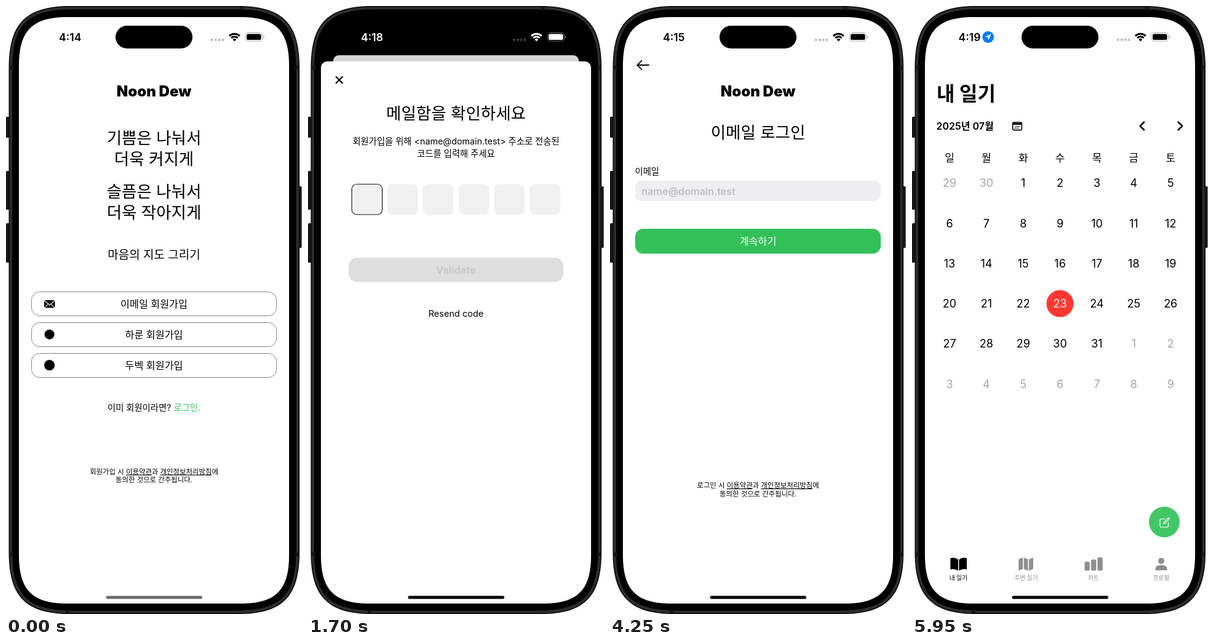
Write an HTML page that moves like this. It is 481x988 px and loops after 6.8 s.

```html
<!DOCTYPE html>
<html lang="ko">
<head>
<meta charset="utf-8">
<title>App tour</title>
<style>
  html, body { margin: 0; width: 100%; height: 100%; overflow: hidden; background: #fff; }
  svg { display: block; }
  text { font-family: Inter, "Noto Sans CJK KR", sans-serif; text-anchor: middle; fill: #000; }
  .left { text-anchor: start; }
  .time { font-size: 17.5px; font-weight: 600; text-anchor: start; }
  .brand { font-size: 24px; font-weight: 900; }
  .hero { font-size: 26.5px; }
  .sub { font-size: 19px; }
  .btn { font-size: 16.2px; }
  .body { font-size: 14.3px; }
  .fine { font-size: 11.4px; }
  .fine tspan { text-decoration: underline; }
  .day { font-size: 18px; }
  .tab { font-size: 9.7px; font-weight: 500; }
  .dim { fill: #a5a5a5; }
  .idle { fill: #8e8e8e; }
  .light { fill: #fff; }
  .line { fill: none; stroke: #000; stroke-linecap: round; stroke-linejoin: round; }
  .outline { fill: #fff; stroke: #858585; }

  .screen {
    visibility: hidden;
    animation: show 3400ms step-end infinite;
    animation-delay: calc(var(--i) * 850ms - 3400ms);
  }
  @keyframes show {
    0% { visibility: visible; }
    25%, 100% { visibility: hidden; }
  }
</style>
</head>
<body>
<svg width="481" height="988" viewBox="0 0 481 988">
  <defs>
    <clipPath id="glass"><path data-box="21 18 439 953 62"/></clipPath>
    <g id="status">
      <g fill="var(--dot, #bdbdbd)">
        <circle cx="334.7" cy="55" r="2.1"/><circle cx="340.7" cy="55" r="2.1"/>
        <circle cx="346.7" cy="55" r="2.1"/><circle cx="352.6" cy="55" r="2.1"/>
      </g>
      <g fill="none" stroke="currentColor" stroke-width="3">
        <path d="M362.9 48.6a11.9 11.9 0 0 1 16.8 0"/>
        <path d="M366.1 51.9a7.3 7.3 0 0 1 10.4 0"/>
      </g>
      <path d="M371.3 57.4l-2.9-2.9a4.1 4.1 0 0 1 5.8 0z" fill="currentColor"/>
      <rect x="389" y="43.5" width="27.5" height="13.5" rx="4.3" fill="none" stroke="var(--rim, #a6a6a6)"/>
      <rect x="391" y="45.5" width="23.5" height="9.5" rx="2.6" fill="currentColor"/>
      <path d="M418 48q1.6.6 1.6 2.3t-1.6 2.3z" fill="var(--rim, #a6a6a6)"/>
    </g>
    <rect id="home" x="162.5" y="958.5" width="156.5" height="5" rx="2.5"/>
  </defs>

  <!-- phone -->
  <g fill="#171717">
    <rect y="180" width="8" height="34" rx="1.5"/>
    <rect y="268" width="8" height="63" rx="1.5"/>
    <rect y="353" width="8" height="64" rx="1.5"/>
    <rect x="473" y="293" width="7.5" height="100" rx="1.5"/>
  </g>
  <path data-box="4.5 0 472.5 988 79" fill="#0c0c0c"/>
  <path data-box="8 3.5 465.5 981 75.5" stroke="#2d2d2d" stroke-width="4"/>
  <path d="M5 100h7M470 100h7M5 891h7M470 891h7M382 0v7M100 981v7" stroke="#151515" stroke-width="6"/>
  <path data-box="21 18 439 953 62" fill="#fff"/>
  <rect x="178" y="32" width="125" height="37" rx="18.5"/>

  <!-- sign up -->
  <g class="screen" style="--i:0">
    <text class="time" x="86" y="57">4:14</text>
    <use href="#status"/>
    <text class="brand" x="240.5" y="147">Noon Dew</text>
    <g class="hero">
      <text x="240.5" y="224">기쁨은 나눠서</text>
      <text x="240.5" y="258">더욱 커지게</text>
      <text x="240.5" y="311">슬픔은 나눠서</text>
      <text x="240.5" y="345">더욱 작아지게</text>
    </g>
    <text class="sub" x="240.5" y="411">마음의 지도 그리기</text>
    <g class="outline">
      <rect x="41.5" y="464.5" width="398" height="39" rx="13"/>
      <rect x="41.5" y="514.5" width="398" height="39" rx="13"/>
      <rect x="41.5" y="564.5" width="398" height="39" rx="13"/>
    </g>
    <rect x="62" y="478" width="17.5" height="12.5" rx="2"/>
    <path d="M62.5 479l8.3 6.8 8.2-6.8M63 490l5-5.4M78.5 490l-5-5.4" fill="none" stroke="#fff" stroke-width="1.1"/>
    <circle cx="70.6" cy="533.7" r="8"/>
    <circle cx="70.6" cy="583.7" r="8.6"/>
    <g class="btn">
      <text x="240.5" y="490">이메일 회원가입</text>
      <text x="240.5" y="540">하룬 회원가입</text>
      <text x="240.5" y="590">두벡 회원가입</text>
    </g>
    <text class="body" x="240.5" y="658">이미 회원이라면? <tspan fill="#34c759">로그인.</tspan></text>
    <text class="fine" x="240.5" y="760.5">회원가입 시 <tspan>이용약관</tspan>과 <tspan>개인정보처리방침</tspan>에</text>
    <text class="fine" x="240.5" y="774">동의한 것으로 간주됩니다.</text>
    <use href="#home" fill="#6e6e6e"/>
  </g>

  <!-- log in -->
  <g class="screen" style="--i:1">
    <text class="time" x="86" y="57">4:15</text>
    <use href="#status"/>
    <path class="line" d="M63 96H44.5M51.5 88.8L44.3 96l7.2 7.2" stroke-width="1.8"/>
    <text class="brand" x="240.5" y="147">Noon Dew</text>
    <text class="hero" x="240.5" y="215">이메일 로그인</text>
    <text class="body left" x="40.5" y="273.5">이메일</text>
    <rect x="41" y="284" width="399" height="33" rx="10" fill="#eeeef1"/>
    <text class="left" x="51" y="307" font-size="16.5" font-weight="500" style="fill:#b9b9bc">name@domain.test</text>
    <rect x="41" y="362" width="399" height="40.5" rx="13" fill="#34c059"/>
    <text class="btn light" x="240.5" y="388">계속하기</text>
    <text class="fine" x="240.5" y="783">로그인 시 <tspan>이용약관</tspan>과 <tspan>개인정보처리방침</tspan>에</text>
    <text class="fine" x="240.5" y="797">동의한 것으로 간주됩니다.</text>
    <use href="#home"/>
  </g>

  <!-- code sheet -->
  <g class="screen" style="--i:2">
    <path data-box="20 17 441 955 63"/>
    <rect x="41" y="80" width="399" height="30" rx="9" fill="#d5d5d5"/>
    <g clip-path="url(#glass)"><rect x="21" y="90" width="439" height="900" rx="10" fill="#fff"/></g>
    <text class="time light" x="86" y="57">4:18</text>
    <use href="#status" style="color:#fff;--dot:#444;--rim:#6c6c6c"/>
    <path class="line" d="M45.7 115l10.2 10.2M55.9 115l-10.2 10.2" stroke-width="2.3"/>
    <text class="hero" x="240.5" y="184">메일함을 확인하세요</text>
    <text class="body" x="240.5" y="224.5">회원가입을 위해 &lt;name@domain.test&gt; 주소로 전송된</text>
    <text class="body" x="240.5" y="244.5">코드를 입력해 주세요</text>
    <g id="code" fill="#f0f0f0"></g>
    <rect x="66" y="409" width="349" height="39.5" rx="14" fill="#dedede"/>
    <text x="240.5" y="435" font-size="16.5" font-weight="600" style="fill:#c5c5c5">Validate</text>
    <text x="240.5" y="505" font-size="14.5">Resend code</text>
    <use href="#home"/>
  </g>

  <!-- diary -->
  <g class="screen" style="--i:3">
    <text class="time" x="75.5" y="57">4:19</text>
    <circle cx="123.7" cy="50.5" r="9.4" fill="#0a7aff"/>
    <path d="M128.6 45.6l-4.3 10-.9-4.8-4.7-.9z" fill="#fff"/>
    <use href="#status"/>
    <text class="left" x="40" y="154" font-size="32" font-weight="700">내 일기</text>
    <text class="left" x="39.5" y="201" font-size="16" font-weight="600">2025년 07월</text>
    <rect class="line" x="163.6" y="189" width="14.8" height="12.6" rx="2.3" stroke-width="1.6"/>
    <path d="M163.6 190h14.8v3h-14.8z"/>
    <path d="M168 195.7h8M166 198.5h8" stroke="#000" stroke-width="1.5" stroke-dasharray="1.5 1"/>
    <path class="line" d="M377 188.7l-6.4 6.3 6.4 6.3M432.7 188.7l6.4 6.3-6.4 6.3" stroke-width="2.7"/>
    <circle cx="240.5" cy="483.6" r="22" fill="#ff3831"/>
    <g id="month"></g>
    <circle cx="410" cy="838.5" r="25" fill="#43c766"/>
    <path class="line" d="M411 833.5h-5.5q-2.500 0-2.500 2.500v8.500q0 2.500 2.500 2.500h8.500q2.500 0 2.500-2.500v-5.500M408.800 841.300l.7-2.600 7.400-7.400 1.700 1.700-7.400 7.400z" style="stroke:#fff" stroke-width="1.2"/>
    <path d="M75 899.5q-5.500-4.500-12.600-2.200v18.200q7-1.800 12.600 2zM76.400 899.5q5.500-4.500 12.600-2.200v18.200q-7-1.800-12.600 2z"/>
    <g class="idle">
      <path d="M173.300 899l6.800-2.800v18.500l-6.800 2.800zM181.700 896.200l6.800 3v18.500l-6.800-3zM190.100 899.200l6.800-3v18.500l-6.800 3z"/>
      <rect x="280.5" y="903" width="8.3" height="14.5" rx="2"/>
      <rect x="291" y="899.5" width="8.3" height="18" rx="2"/>
      <rect x="301.5" y="896" width="8.3" height="21.5" rx="2"/>
      <circle cx="405" cy="901.8" r="5"/>
      <path d="M395.5 917v-2.500q0-6 9.500-6t9.500 6v2.500z"/>
    </g>
    <g class="tab">
      <text x="75.5" y="933">내 일기</text>
      <text class="idle" x="185.5" y="933">주변 일기</text>
      <text class="idle" x="295" y="933">차트</text>
      <text class="idle" x="405" y="933">프로필</text>
    </g>
    <use href="#home"/>
  </g>
</svg>
<script>
  // Rounded box whose corners ease into the sides instead of ending in a plain arc.
  function smoothBox(x, y, w, h, r) {
    const e = r * 1.28, k = r * 0.35, X = x + w, Y = y + h;
    return `M${x + e} ${y}H${X - e}C${X - k} ${y} ${X} ${y + k} ${X} ${y + e}
      V${Y - e}C${X} ${Y - k} ${X - k} ${Y} ${X - e} ${Y}
      H${x + e}C${x + k} ${Y} ${x} ${Y - k} ${x} ${Y - e}
      V${y + e}C${x} ${y + k} ${x + k} ${y} ${x + e} ${y}Z`;
  }
  for (const path of document.querySelectorAll('[data-box]'))
    path.setAttribute('d', smoothBox(...path.dataset.box.split(' ').map(Number)));

  const fill = (id, n, draw) => {
    document.getElementById(id).innerHTML += Array.from({ length: n }, (_, i) => draw(i)).join('');
  };
  const colX = i => 61 + (i % 7) * 59.87;

  fill('code', 6, i => `<rect x="${71.1 + i * 57.85}" y="289.5" width="49.5" height="49.5" rx="8"
    ${i ? '' : 'stroke="#1c1c1c" stroke-width="1.2"'}/>`);

  fill('month', 7, i => `<text x="${colX(i)}" y="253" font-size="17">${'일월화수목금토'[i]}</text>`);

  fill('month', 42, i => {
    const date = new Date(2025, 5, 29 + i);
    const y = 294.3 + Math.floor(i / 7) * 65.25;
    const d = date.getDate();
    const inMonth = date.getMonth() === 6;
    const tone = !inMonth ? 'dim' : d === 23 ? 'light' : '';
    return `<text class="day ${tone}" x="${colX(i)}" y="${y}">${d}</text>`;
  });
</script>
</body>
</html>
```
